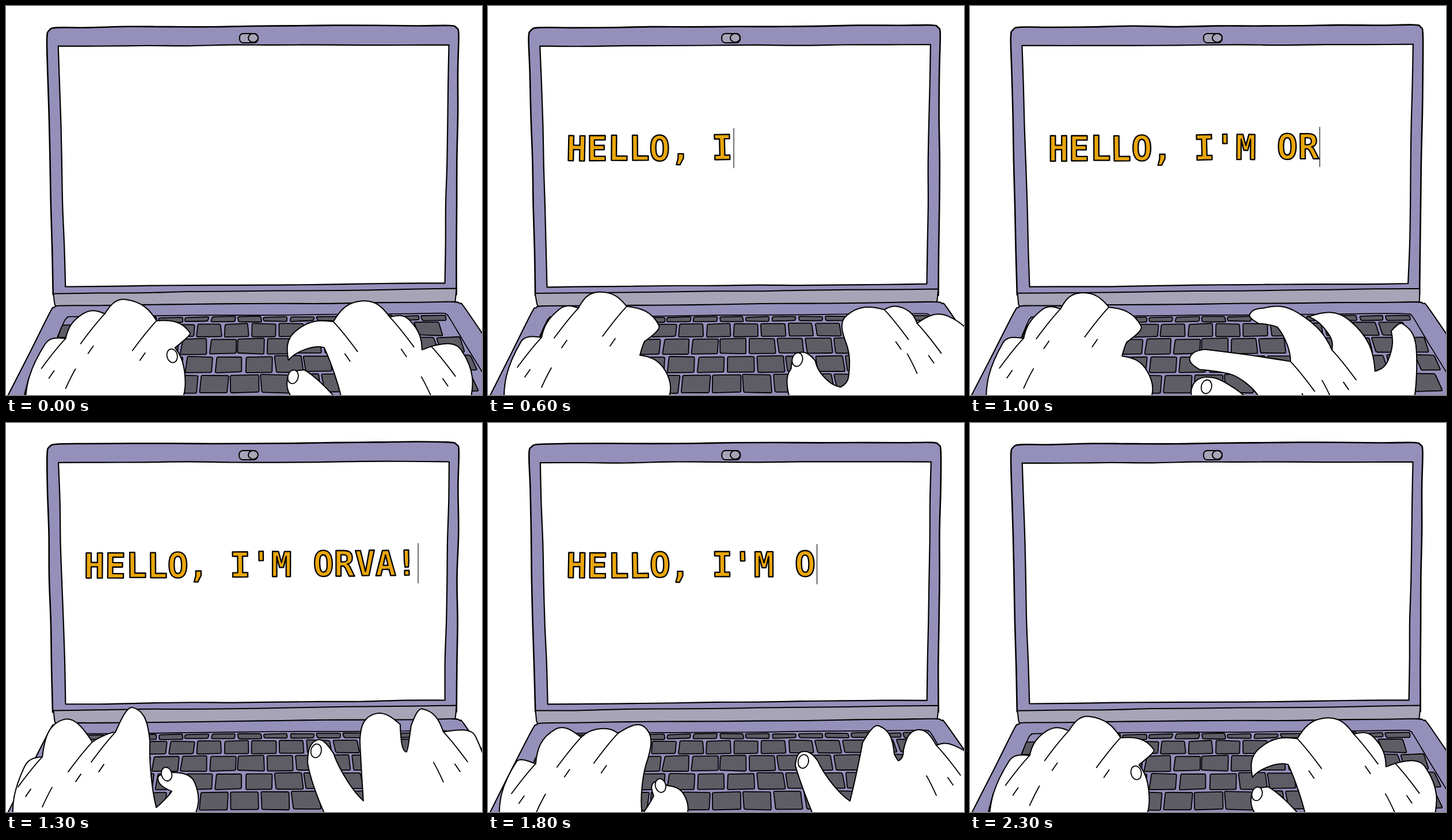
These frames come from a looping animation (827 by 677 pixels, 2.4 s). An HTML page:

```html
<!DOCTYPE html>
<html lang="en">
<head>
<meta charset="utf-8">
<title>Typing hands</title>
<style>
html, body { margin: 0; width: 100%; height: 100%; overflow: hidden; background: #fff; }
svg { display: block; width: 100vw; height: 100vh; }
path, rect, ellipse { stroke: #000; stroke-linecap: round; stroke-linejoin: round; }
text { font: bold 60px "DejaVu Sans Mono", monospace; fill: #e9a60c; stroke: #000; stroke-width: 2.3; stroke-linejoin: round; text-anchor: middle; }
</style>
</head>
<body>
<svg id="stage" viewBox="0 0 827 677"></svg>
<script>
const STEP = 100, STEPS = 24;
const LILAC = '#9490ba', GREY = '#a7a4b8', KEY = '#5e5d66', WHITE = '#fff';
const MESSAGE = "HELLO, I'M ORVA!";
const GLYPHS = MESSAGE.replaceAll(' ', '').length;
const PITCH = 36.13, TEXT_X = 136;

// Outlines alternate base and apex of each finger; "*" starts a crease.
const LEFT = [
  { from: 0, nail: [289, 608], hand: '34,690 68,588 104,578* 134,535 172,535* 208,510 262,547* 320,568 294,594 311,640 304,690' },
  { from: 3, hand: '29,690 58,585 94,577* 125,528 158,526* 194,498 242,523* 298,556 273,584 269,594 265,608 309,635 313,690' },
  { from: 12, nail: [279, 610], hand: '12,690 32,597 63,580* 100,515 150,554* 172,542 190,537* 220,494 250,553 252,612 261,668 275,655 288,640 264,616 290,607 328,625 324,690' },
  { from: 15, nail: [300, 630], hand: '20,690 50,588 83,592* 117,532 162,546* 196,531 226,539* 272,528 278,583 268,630 268,680 279,664 288,648 288,625 312,630 342,648 343,690' }
];
const RIGHT = [
  { from: 0, nail: [498, 645], hand: '584,690 570,640 552,594 520,597 490,616 502,566 568,549* 618,513 666,541* 700,546 722,598 730,595 738,592* 790,598 805,690', thumb: '503,690 489,645 518,633 547,656 578,690' },
  { from: 3, nail: [537, 616], hand: '528,690 519,655 526,632 540,604 568,618 585,648 612,664 626,645 622,588 622,540 688,529* 720,526 745,553* 800,541 850,600' },
  { from: 8, nail: [412, 662], hand: '508,690 480,655 440,637 420,634 400,632 383,612 410,597 480,606 558,618* 552,588 535,558 520,554 503,552 487,537 512,525 572,534 630,598* 624,570 590,540 660,546 705,635 728,615 733,565 752,552 776,590 777,640 772,690', thumb: '392,690 388,660 412,645 445,655 490,690' },
  { from: 12, nail: [538, 570], hand: '558,690 535,635 523,590 540,551 568,574 592,622 620,657 617,610 614,554 636,507 684,524 695,572 703,526 722,497 759,537* 815,545 832,690' },
  { from: 15, nail: [547, 588], hand: '568,690 548,640 533,595 545,571 572,587 598,628 628,657 640,605 650,555 678,526 705,575 712,587 721,568 745,533 778,560* 808,560 850,590' }
];

const noise = n => {
  const s = Math.sin(n * 12.9898 + 4.1) * 43758.5453;
  return (s - Math.floor(s)) * 2 - 1;
};
const mix = (a, b, t) => a.map((v, i) => v + (b[i] - v) * t);
const add = (a, b, k = 1) => a.map((v, i) => v + b[i] * k);
const distance = (a, b) => Math.hypot(b[0] - a[0], b[1] - a[1]);
const path = (d, fill, width) => `<path d="${d}" fill="${fill}" stroke-width="${width}"/>`;

// Catmull-Rom spline; a repeated point is a sharp corner
function smooth(points) {
  const at = i => points[Math.max(0, Math.min(points.length - 1, i))];
  let d = 'M' + points[0];
  for (let i = 0; i < points.length - 1; i++) {
    const [a, b, c, e] = [at(i - 1), at(i), at(i + 1), at(i + 2)];
    if (b === c) continue;
    d += `C${add(b, add(c, a, -1), 1 / 6)} ${add(c, add(e, b, -1), -1 / 6)} ${c}`;
  }
  return d;
}

// Hand-drawn polygon; corners are [x, y, radius]
function rough(corners, seed, amount, closed = true) {
  const count = corners.length, points = [];
  const shaky = (p, n) => [p[0] + noise(seed + n) * amount, p[1] + noise(seed + n + 50) * amount];
  corners.forEach(([x, y, r = 0], i) => {
    const p = shaky([x, y], i);
    const prev = corners[(i + count - 1) % count].slice(0, 2);
    const next = corners[(i + 1) % count].slice(0, 2);
    if (r) {
      const a = mix(p, prev, r / distance(p, prev)), b = mix(p, next, r / distance(p, next));
      points.push(a, mix(mix(a, b, .5), p, .5), b);
    } else points.push(p, p);
    if (!closed && i === count - 1) return;
    const parts = Math.round(distance(p, next) / 75);
    for (let k = 1; k < parts; k++) points.push(shaky(mix(p, next, k / parts), i * 13 + k + 100));
  });
  if (closed) points.push(points[0]);
  return smooth(points);
}

function keys(seed) {
  // top, height and x of a key near the middle
  const rows = [[541, 8, 403], [553, 22, 427], [579, 26, 404], [610, 27, 416], [642, 31, 444]];
  return rows.map(([top, height, ref], row) => {
    const pitch = 45.7 + row * 2, depth = top + height / 2 - 545;
    const min = 107 - depth * .63, max = 765 + depth * .6;
    let out = '';
    for (let k = -9; k < 10; k++) {
      let x0 = ref + k * pitch, x1 = x0 + pitch - 5.5;
      if (x1 + 18 > max) x1 = max;
      x0 = Math.max(x0, min);
      if (x1 - x0 < 18) continue;
      const corner = (x, down, n) => {
        const id = row * 400 + k * 20 + n;
        return [
          x + (x - 420) * height * .001 * (down - .5) + noise(id) * 1.1 + noise(seed + id) * .7,
          top + height * down - (x - 420) * .007 + noise(id + 5) * .7 + noise(seed + id + 5) * .5
        ];
      };
      const quad = [corner(x0, 0, 0), corner(x1, 0, 1), corner(x1, 1, 2), corner(x0, 1, 3)];
      const near = (a, b) => mix(a, b, 2.5 / distance(a, b));
      const d = quad.map((p, i) =>
        `${i ? 'L' : 'M'}${near(p, quad[(i + 3) % 4])}Q${p} ${near(p, quad[(i + 1) % 4])}`).join('');
      out += path(d + 'Z', KEY, 1.8);
    }
    return out;
  }).join('');
}

function laptop(seed) {
  const lid = [[82, 503], [71, 37, 18], [786, 33, 16], [782, 503]];
  const screen = [[91, 69], [769, 67], [762, 483], [103, 489]];
  const hinge = [[82, 500], [782, 492], [780, 520, 8], [86, 527, 8]];
  const deck = [[0, 684], [82, 522, 13], [790, 515, 14], [852, 606], [852, 700], [0, 700]];
  const bed = [[86, 584], [105, 541, 9], [766, 535, 9], [832, 645]];
  const camera = 406 + noise(seed);
  return path(rough(lid, seed, 1), LILAC, 2.6) +
    path(rough(screen, seed + 1, .9), WHITE, 2.2) +
    `<g fill="${GREY}" stroke-width="2"><rect x="${camera}" y="48" width="32" height="16" rx="6.5"/>` +
    `<ellipse cx="429.5" cy="55.5" rx="8.5" ry="7.5"/></g>` +
    path(rough(hinge, seed + 2, .7), GREY, 2) +
    path(rough(deck, seed + 3, .7), LILAC, 2.1) +
    path(rough(bed, seed + 4, .6, false), 'none', 1.7) +
    keys(seed);
}

// Rounded bump from base a over the apex to base b
function arch(a, apex, b) {
  const chord = add(b, a, -1), rise = add(apex, a, -1);
  const along = (rise[0] * chord[0] + rise[1] * chord[1]) / (chord[0] ** 2 + chord[1] ** 2);
  const foot = mix(a, b, along), up = add(apex, foot, -1);
  const side = base => {
    const run = add(foot, base, -1);
    return [add(add(base, up, .6), run, .25), add(apex, run, -.5)];
  };
  const [a1, a2] = side(a), [b1, b2] = side(b);
  return `C${a1} ${a2} ${apex}C${b2} ${b1} ${b}`;
}

function outline(spec) {
  const points = spec.split(' ').map(t => t.replace('*', '').split(',').map(Number));
  let d = 'M' + points[0];
  for (let i = 0; i + 2 < points.length; i += 2) d += arch(points[i], points[i + 1], points[i + 2]);
  return path(`${d}V720H${points[0][0]}Z`, WHITE, 2);
}

function hand(poses, step, side, seed) {
  const { hand, thumb, nail } = poses.findLast(p => p.from <= step);
  const creased = hand.split(' ').filter(t => t.endsWith('*')).map(t => t.slice(0, -1).split(',').map(Number));
  const [px, py] = creased.at(side < 0 ? 0 : -1);
  let lines = `M${px - side * 17} ${py + 53}q${side * 8} 14 ${side * 17} 34`;
  for (const [x, y] of creased) {
    lines += `M${x} ${y}q${side * 17} 18 ${side * 42} 52`;
    lines += `M${x + side * 20} ${y + 56}l${side * 9} 13`;
  }
  return `<g transform="translate(${noise(seed) * 1.2} ${noise(seed + 1) * 1.2})">` +
    outline(hand) + (thumb ? outline(thumb) : '') + path(lines, 'none', 1.8) +
    (nail ? `<ellipse cx="${nail[0]}" cy="${nail[1]}" rx="9" ry="12" fill="${WHITE}" stroke-width="1.8" transform="rotate(${side * 14} ${nail})"/>` : '') +
    '</g>';
}

// One glyph per step while typing, two per step while erasing
function typing(step, seed) {
  const typed = step < 3 ? step : step + 1;
  let left = Math.min(typed, GLYPHS, GLYPHS - 2 * (step - 16));
  if (left < 1) return '';
  let out = '', i = 0;
  for (; left > 0; i++) {
    if (MESSAGE[i] === ' ') continue;
    left--;
    const x = TEXT_X + (i + .5) * PITCH + noise(seed + i) * .6;
    const y = 270 + noise(seed + i + 40) * .6;
    const turn = noise(i + 7) * 1.2 + noise(seed + i + 80) * .8;
    out += `<text x="${x}" y="${y}" transform="rotate(${turn} ${x} 248)">${MESSAGE[i]}</text>`;
  }
  const x = TEXT_X + 2 + i * PITCH;
  return `<g transform="rotate(-.5 137 270)">${out}</g>` +
    path(`M${x} ${216 - i * .4}V${285 - i * .4}`, 'none', 1.1);
}

const stage = document.getElementById('stage');
const start = performance.now();
let shown = -1;

function tick() {
  const step = Math.floor((performance.now() - start) / STEP) % STEPS;
  if (step !== shown) {
    shown = step;
    const look = step % (STEPS - 1), seed = look * 1371;
    stage.innerHTML = laptop(seed) + typing(step, seed) +
      hand(LEFT, look, -1, seed + 1) + hand(RIGHT, look, 1, seed + 3);
  }
  requestAnimationFrame(tick);
}
tick();
</script>
</body>
</html>
```
